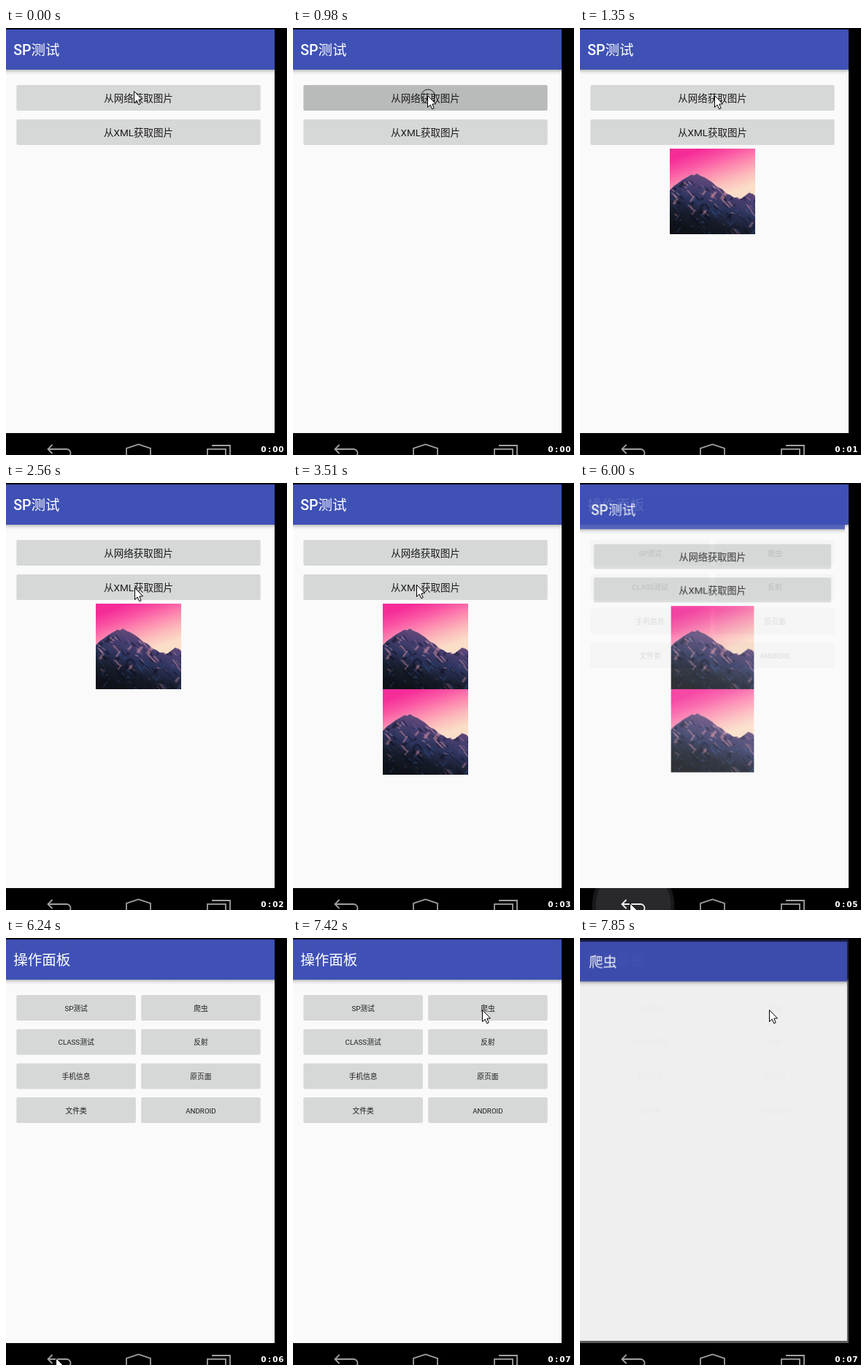
An HTML page with a canvas that plays this animation: 385x584 px, repeating every 8000 ms.

```html
<!DOCTYPE html>
<html lang="zh-CN">
<head>
<meta charset="utf-8">
<title>SP测试</title>
<style>
html, body { margin: 0; width: 100%; height: 100%; overflow: hidden; background: #000; }
canvas { display: block; width: 385px; height: 584px; }
</style>
</head>
<body>
<canvas id="stage"></canvas>
<script>
const W = 385, H = 584, LOOP = 8000;
const STEP = 122.5; // the screen is sampled about eight times a second
const SANS = 'Roboto, "Noto Sans CJK SC", "Noto Sans CJK", sans-serif';
const SCREEN = { x: -5, y: 2, w: 373, h: 552 };
const MID = { x: 181.5, y: 278 };
const NAV = SCREEN.y + SCREEN.h;
const BACK = { start: 5750, end: 6240 };
const OPEN = { start: 7600, end: 7864 };
const dpr = window.devicePixelRatio || 1;

function makeContext(canvas) {
  canvas.width = W * dpr;
  canvas.height = H * dpr;
  return canvas.getContext('2d');
}
const ctx = makeContext(document.getElementById('stage'));
const layer = makeContext(document.createElement('canvas'));

// Pointer moves: start, end, target x, target y
const moves = [
  [0, 240, 184, 92], [1940, 2400, 185, 156], [2400, 2710, 169, 132], [2710, 2810, 169, 139],
  [3790, 4250, 308, 283], [4250, 4400, 335, 401], [4400, 4770, 100, 568], [4770, 5140, 68, 574],
  [6250, 6360, 201, 174], [6360, 7050, 259, 98]
];
const clicks = [[980, 1200], [3140, 3510], [5610, BACK.start], [7200, 7340]];

const clamp = v => Math.min(1, Math.max(0, v));
const progress = (t, a, b) => clamp((t - a) / (b - a));
const within = (t, a, b) => t >= a && t < b;
const mix = (a, b, p) => a + (b - a) * p;

function seeded(seed) {
  return () => (seed = (seed * 16807) % 2147483647) / 2147483647;
}

function text(c, str, x, y, size, color, align = 'center', weight = 400, family = SANS) {
  c.font = `${weight} ${size}px ${family}`;
  c.fillStyle = color;
  c.textAlign = align;
  c.fillText(str, x, y);
}

function poly(c, pts, close) {
  c.beginPath();
  pts.forEach(([x, y]) => c.lineTo(x, y));
  if (close) c.closePath();
}

// Colours are spread evenly along the line.
function gradient(c, x0, y0, x1, y1, ...colors) {
  const g = c.createLinearGradient(x0, y0, x1, y1);
  colors.forEach((color, i) => g.addColorStop(i / (colors.length - 1), color));
  return g;
}

function page(c, title) {
  const { x, y, w, h } = SCREEN;
  c.fillStyle = '#fafafa';
  c.fillRect(x, y, w, h);
  c.fillStyle = gradient(c, 0, 57, 0, 64, 'rgba(0,0,0,.25)', 'rgba(0,0,0,.07)', 'rgba(0,0,0,0)');
  c.fillRect(x, 57, w, 7);
  c.fillStyle = '#3f51b5';
  c.fillRect(x, y, w, 55);
  text(c, title, 10.3, 37, 19.5, '#fff', 'left', 500);
}

function button(c, label, x, y, w, size, pressed) {
  c.fillStyle = pressed ? '#b9bbba' : '#d6d7d7';
  c.beginPath();
  c.roundRect(x, y, w, 35, 2);
  c.fill();
  text(c, label, x + w / 2, y + 17.8 + size * 0.38, size, '#1c1c1c');
}

function ridge(rand) {
  const keys = [[0, 57], [22, 40], [37, 34], [58, 46], [84, 64], [96, 69], [109, 60], [117, 65]];
  const pts = [];
  for (let i = 1; i < keys.length; i++) {
    const [a, b] = [keys[i - 1], keys[i]];
    for (let p = 0; p < 1; p += 0.25) {
      pts.push([mix(a[0], b[0], p), mix(a[1], b[1], p) + (p && rand() * 3 - 1.5)]);
    }
  }
  return [...pts, keys.at(-1), [117, 117], [0, 117]];
}

function photo(c, x, y) {
  const rand = seeded(77);
  c.save();
  c.translate(x, y);
  c.beginPath();
  c.rect(0, 0, 117, 117);
  c.clip();
  c.fillStyle = gradient(c, 45, 0, 68, 66, '#f52c98', '#fa55a4', '#fd8ab0', '#fcbabb', '#fbdec8');
  c.fillRect(0, 0, 117, 117);
  poly(c, ridge(rand), true);
  c.fillStyle = gradient(c, 55, 32, 30, 114, '#74507d', '#4b4072', '#2b3259', '#171c2a', '#0e1117');
  c.fill();
  c.clip();
  // slanted rock faces, lit near the crest and dark towards the foot
  for (let i = 0; i < 190; i++) {
    const px = rand() * 117, depth = rand(), py = 36 + px * 0.22 + depth * 68;
    const len = 3 + rand() * 8, wide = 1 + rand() * 4, lean = rand() < 0.7 ? 0.7 : -0.6;
    const lit = rand() < 0.5 - depth * 0.4;
    c.fillStyle = lit ? `rgba(215,145,165,${0.6 - depth * 0.4})`
      : rand() < 0.3 ? 'rgba(50,80,140,.35)' : 'rgba(14,16,30,.5)';
    poly(c, [[px, py], [px + wide, py + 1], [px + len * lean + wide, py + len], [px + len * lean, py + len * 0.8]], true);
    c.fill();
  }
  c.restore();
}

function prefsPage(c, t) {
  page(c, 'SP测试');
  button(c, '从网络获取图片', 14.3, 78, 334.4, 13.5, within(t, 980, 1200));
  button(c, '从XML获取图片', 14.3, 125, 334.4, 13.5, within(t, 3390, 3510));
  if (t >= 1340) photo(c, 123, 165);
  if (t >= 3510) photo(c, 123, 282);
}

function panelPage(c) {
  page(c, '操作面板');
  ['SP测试', '爬虫', 'CLASS测试', '反射', '手机信息', '原页面', '文件类', 'ANDROID'].forEach((label, i) =>
    button(c, label, 14.3 + 170.8 * (i % 2), 78 + 46.7 * (i >> 1), 163.6, 9.75));
}

// Draws a whole page scaled about the screen centre with one opacity.
function fadePage(paint, scale, alpha) {
  layer.setTransform(dpr, 0, 0, dpr, 5 * dpr, 0);
  layer.clearRect(-5, 0, W, H);
  paint(layer);
  ctx.save();
  ctx.globalAlpha = alpha;
  ctx.translate(MID.x, MID.y);
  ctx.scale(scale, scale);
  ctx.drawImage(layer.canvas, -5 - MID.x, -MID.y, W, H);
  ctx.restore();
}

function pages(t) {
  if (t < BACK.start) return prefsPage(ctx, t);
  panelPage(ctx);
  if (t < BACK.end) {
    const p = progress(t, BACK.start, BACK.end);
    fadePage(c => prefsPage(c, t), 1 - 0.054 * p, 1 - p ** 3);
  } else if (t >= OPEN.start) {
    const p = progress(t, OPEN.start, OPEN.end);
    ctx.fillStyle = `rgba(0,0,0,${0.85 * p ** 3})`;
    ctx.fillRect(0, 0, 368, NAV);
    fadePage(c => page(c, '爬虫'), mix(0.877, 1, p), p ** 0.7);
  }
}

function disc(x, y, r, shade) {
  ctx.fillStyle = `rgb(${shade},${shade},${shade + 3})`;
  ctx.beginPath();
  ctx.arc(x, y, r, 0, 7);
  ctx.fill();
}

function navBar(t) {
  const lit = within(t, BACK.start, BACK.end);
  ctx.save();
  ctx.beginPath();
  ctx.rect(0, NAV, W, H - NAV);
  ctx.clip();
  ctx.fillStyle = '#000';
  ctx.fillRect(0, NAV, W, H - NAV);
  if (lit) {
    const p = progress(t, BACK.start, BACK.end);
    const r = 57 - 13 * (1 - p) ** 4, power = clamp(2 - 2 * p);
    disc(73, 577, r, 26 * power);
    disc(73, 577, r - 5, 42 * power);
  }
  ctx.lineWidth = 1.8;
  ctx.strokeStyle = lit ? '#f0f0f0' : '#a0a0a0';
  poly(ctx, [[63.5, 570], [57.5, 576], [63.5, 582]]);
  ctx.moveTo(58, 576);
  ctx.lineTo(83, 576);
  ctx.arc(83, 581.5, 5.5, -Math.PI / 2, Math.PI / 2);
  ctx.stroke();
  ctx.strokeStyle = '#a0a0a0';
  poly(ctx, [[165, 590], [165, 575], [181.5, 569.5], [198, 575], [198, 590]]);
  ctx.stroke();
  poly(ctx, [[282, 571], [307, 571], [307, 590]]);
  ctx.stroke();
  ctx.strokeRect(276, 576, 25, 20);
  ctx.restore();
}

function clock(t) {
  const s = Math.max(0, Math.floor((t - 100) / 1000));
  [...`0:0${s}`].forEach((ch, i) =>
    text(ctx, ch, 353 + i * 8, 579.5, 10.5, '#fff', 'center', 700, '"DejaVu Sans", sans-serif'));
}

function pointerAt(t) {
  let x = 175, y = 86;
  for (const [a, b, tx, ty] of moves) {
    const p = progress(t, a, b);
    x = mix(x, tx, p);
    y = mix(y, ty, p);
  }
  return [Math.round(x), Math.round(y)];
}

function pointer(t) {
  const [x, y] = pointerAt(t);
  ctx.save();
  ctx.translate(x + 0.5, y + 0.5);
  ctx.lineWidth = 1;
  if (clicks.some(([a, b]) => within(t, a, b))) {
    ctx.strokeStyle = '#222';
    ctx.beginPath();
    ctx.arc(0.5, 1, 9.5, 0, 7);
    ctx.stroke();
  }
  poly(ctx, [[0, 0], [0, 16], [3.7, 12.6], [6.2, 18.3], [8.7, 17.2], [6.3, 11.6], [11, 11.3]], true);
  ctx.fillStyle = '#fff';
  ctx.fill();
  ctx.strokeStyle = '#000';
  ctx.stroke();
  ctx.restore();
}

const start = performance.now();
function draw() {
  const now = (performance.now() - start) % LOOP;
  const t = Math.floor(now / STEP + 0.42) * STEP;
  ctx.setTransform(dpr, 0, 0, dpr, 0, 0);
  ctx.fillStyle = '#000';
  ctx.fillRect(0, 0, W, H);
  pages(t);
  navBar(t);
  clock(t);
  pointer(t);
  requestAnimationFrame(draw);
}
draw();
</script>
</body>
</html>
```
